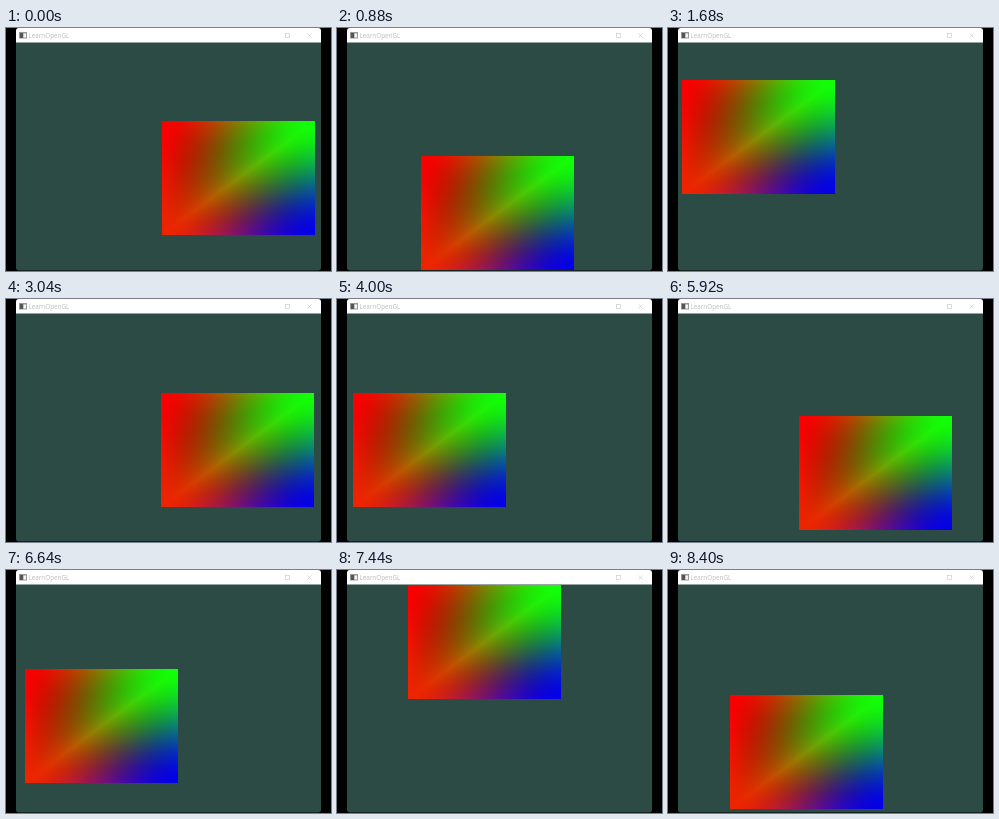
Animation, 325 px wide and 243 px high, one loop 8480 ms. Source, as an HTML page with a canvas:

```html
<!DOCTYPE html>
<html lang="en">
<head>
<meta charset="utf-8">
<title>Orbiting quad</title>
<style>
  html, body { margin: 0; width: 100%; height: 100%; overflow: hidden; background: #000; }
  canvas { display: block; }
</style>
</head>
<body>
<canvas id="stage" width="325" height="243"></canvas>
<script>
const ctx = document.getElementById('stage').getContext('2d');
const LOOP = 8480, STEP = 80;
const QUAD_W = 153, QUAD_H = 114;

// Orbit angle in degrees, clockwise from the top: [time in ms, angle]
const ORBIT = [
  [0, 113.3], [160, 115], [400, 116.6], [1680, 289.4], [3040, 474.3], [4000, 606],
  [5120, 755.3], [6640, 960.9], [7440, 1069], [7760, 1191.7], [8400, 1278.2]
];

// Moments where the picture stands still: [from, until]
const HOLDS = [[0, 160], [160, 400], [1520, 1680], [6080, 6240], [7440, 7760], [7760, 7920]];

function orbitAngle(time) {
  const hold = HOLDS.find(([from, until]) => time >= from && time < until);
  const t = hold ? hold[0] : Math.floor(time / STEP) * STEP;
  const next = Math.max(1, ORBIT.findIndex(([at]) => at >= t));
  const [t0, a0] = ORBIT[next - 1], [t1, a1] = ORBIT[next];
  return (a0 + (a1 - a0) * (t - t0) / (t1 - t0)) * Math.PI / 180;
}

const smooth = w => w * w * (3 - 2 * w);

// Two triangles with blended vertex colours, split from bottom left to top right
function makeQuad() {
  const topLeft = [250, 0, 0], topRight = [18, 255, 8];
  const bottomLeft = [238, 36, 0], bottomRight = [4, 0, 232];
  const quad = document.createElement('canvas');
  quad.width = QUAD_W;
  quad.height = QUAD_H;
  const quadCtx = quad.getContext('2d');
  const image = quadCtx.createImageData(QUAD_W, QUAD_H);
  for (let y = 0, i = 0; y < QUAD_H; y++) {
    for (let x = 0; x < QUAD_W; x++, i += 4) {
      const u = (x + 0.5) / QUAD_W, v = (y + 0.5) / QUAD_H;
      const upper = u + v < 1;
      const corner = upper ? topLeft : bottomRight;
      const right = upper ? u : 1 - v, left = upper ? v : 1 - u;
      const [wc, wr, wl] = [1 - right - left, right, left].map(smooth);
      for (let c = 0; c < 3; c++) {
        image.data[i + c] = corner[c] * wc + topRight[c] * wr + bottomLeft[c] * wl;
      }
      image.data[i + 3] = 255;
    }
  }
  quadCtx.putImageData(image, 0, 0);
  return quad;
}

function box(color, x, y, w, h) {
  ctx.fillStyle = color;
  ctx.fillRect(x, y, w, h);
}

function drawWindow() {
  box('#000', 0, 0, 325, 243);
  ctx.save();
  ctx.beginPath();
  ctx.roundRect(10, 0, 305, 242.5, 3);
  ctx.clip();
  box('#2c4b44', 10, 0, 305, 243);
  box('#fff', 10, 0, 305, 14.5);
  ctx.restore();

  box('#999', 13, 4, 8, 6.5);
  box('#555', 14, 5, 3, 5);
  box('#f4f4f4', 17.5, 5.5, 2.5, 4);

  ctx.fillStyle = '#bbb';
  ctx.font = '6.3px "Open Sans", sans-serif';
  ctx.fillText('LearnOpenGL', 22.5, 10);

  ctx.strokeStyle = '#ccc';
  ctx.lineWidth = 0.7;
  ctx.strokeRect(279.5, 5.5, 4, 4);
  ctx.beginPath();
  ctx.moveTo(301.5, 5.5);
  ctx.lineTo(305.5, 9.5);
  ctx.moveTo(305.5, 5.5);
  ctx.lineTo(301.5, 9.5);
  ctx.stroke();
}

const quad = makeQuad();

function render() {
  const angle = orbitAngle(performance.now() % LOOP);
  drawWindow();
  ctx.drawImage(quad,
    Math.floor(86.25 + 76.25 * Math.sin(angle)),
    Math.floor(71.25 - 57.25 * Math.cos(angle)));
  requestAnimationFrame(render);
}
render();
</script>
</body>
</html>
```
